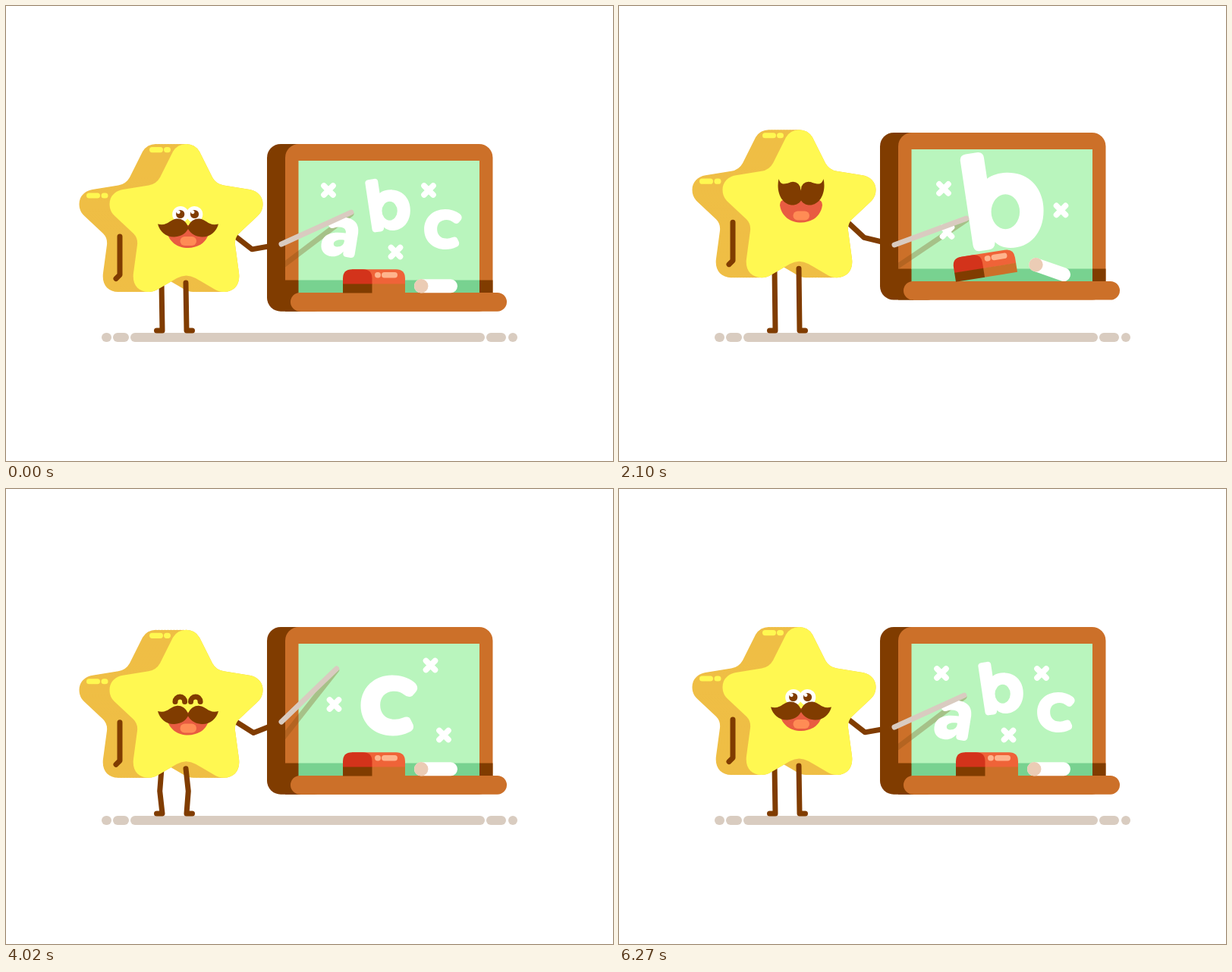
Recreate the animation shown at these times as an HTML page. Size 800 px wide and 600 px high, loop 6.3 s.

```html
<!DOCTYPE html>
<html lang="en">
<head>
<meta charset="utf-8">
<title>Star teacher</title>
<style>
  html, body { margin: 0; width: 100%; height: 100%; overflow: hidden; background: #fff; }
  svg { display: block; width: 800px; height: 600px; }
  .limb { fill: none; stroke: #803c00; stroke-width: 7; stroke-linecap: round; stroke-linejoin: round; }
  .cross { stroke: #fff; stroke-width: 7.6; stroke-linecap: round; }
</style>
</head>
<body>
<svg viewBox="0 0 800 600">
  <defs>
    <path id="star" d="M237.5 182Q249 182 255 192L272 226Q277 235 287 236.5L321 242C331 243.5 338.5 251 338.5 261C338.5 268 336 273 331 277.5L307 300Q301 306 302 315L307 352C309 367 301 377 287 377Q280 377 274 373L250 359Q237.5 352 225 359L201 373Q195 377 188 377C174 377 166 367 168 352L173 315Q174 306 168 300L144 277.5C139 273 136.5 268 136.5 261C136.5 251 144 243.5 154 242L188 236.5Q198 235 203 226L220 192Q226 182 237.5 182Z"/>
    <path id="a" d="M478 259C475 250 480 247 488 245.5Q500 243 510 243.5C530 245 542 256 539.5 276L532.5 320Q531 327.5 524 327L515 325.5Q508 324.5 508.5 318L509 314C503 321 495 325 485 324C470 322.5 462 312 463.5 299C465 283 478 276 493 275Q502 274.5 514 276Q515 266 505 264Q496 263 489 265.5Q481 268 478 259ZM511 290.5C500 288.5 490 291 489 297.5C488.5 303 494 305 500 304C507 302.5 511 298 511 290.5Z"/>
    <path id="b" d="M459.5 230Q458 223 465 221.5L477 219.5Q484 218.5 485 225L488.5 248C495 243.5 503 241.5 511 241.5C535 241.5 550 259 550 283C550 307 535 323.5 514 323.5C507 323.5 501 321 497 317Q497.5 324.5 490 325.5L480 327Q474 327.5 473 320ZM508.5 265A15.5 19 0 0 0 508.5 303A15.5 19 0 0 0 508.5 265Z"/>
    <path id="c" d="M538 254C543 258 544.5 263 540 268L536 272.5Q531 276 525 271C521 268 517 266.5 512 266.5C500 266.5 493 274 493 285C493 296 500 303.5 511 304Q517 304.5 523 302Q531 298.5 533.5 304L537 311Q539 318 532 321C525 324.5 518 326 510 326C485 326 467 309 467 285.5C467 262 485 245 509 245C520 245 530 248 538 254Z"/>
    <clipPath id="face"><path d="M368 150H660V378H368Z"/></clipPath>
  </defs>

  <g fill="#d9ccc0">
    <rect x="126" y="431" width="13" height="12" rx="6"/>
    <rect x="141" y="431" width="21" height="12" rx="6"/>
    <rect x="164" y="431" width="467" height="12" rx="6"/>
    <rect x="633" y="431" width="26" height="12" rx="6"/>
    <rect x="662" y="431" width="12" height="12" rx="6"/>
  </g>

  <path id="arm" class="limb"/>
  <path id="legL" class="limb"/>
  <g id="body">
    <g id="side" fill="#efbe45"></g>
    <g fill="#fff851">
      <rect x="189" y="186" width="18" height="7.2" rx="3.6"/>
      <rect x="208" y="186" width="9" height="7.2" rx="3.6"/>
      <rect x="106" y="246.4" width="18" height="7.2" rx="3.6"/>
      <rect x="125.5" y="246.4" width="9" height="7.2" rx="3.6"/>
      <use href="#star"/>
    </g>
    <path class="limb" d="M150 304V354.5L145 359.5"/>
    <g id="features">
      <path fill="#e85c41" d="M212 296Q212 288 222 289H258Q268 288 268 296C266 311 254 319 240 319C226 319 214 311 212 296Z"/>
      <rect x="229.5" y="304" width="21.5" height="12" rx="6" fill="#ff8c55"/>
      <g id="eyesOpen">
        <g fill="#fff"><circle cx="230" cy="274.7" r="10.8"/><circle cx="248.5" cy="274.7" r="10.8"/></g>
        <g fill="#803c00"><circle cx="229.7" cy="274.5" r="5.6"/><circle cx="248.5" cy="274.5" r="5.6"/></g>
        <g fill="#fff"><circle cx="227.3" cy="271.8" r="2.4"/><circle cx="246.1" cy="271.8" r="2.4"/></g>
      </g>
      <path id="eyesShut" class="limb" d="M223 275A6.3 6.3 0 0 1 235.6 275M243.5 275A6.3 6.3 0 0 1 256.1 275"/>
      <g fill="#803c00"><path id="hairL"/><path id="hairR" transform="matrix(-1 0 0 1 480 0)"/></g>
    </g>
  </g>
  <path id="legR" class="limb"/>

  <g id="board">
    <rect x="344" y="182" width="80" height="220.7" rx="18" fill="#803c00"/>
    <rect x="368" y="182" width="273.5" height="220.7" rx="18" fill="#cc7029"/>
    <path fill="#803c00" d="M368 361.5H641.5V378.5H388V402.7H368Z"/>
    <path fill="#b9f5bd" d="M385.5 204H624V362H385.5Z"/>
    <path fill="#78d290" d="M385.5 361.5H624V379H385.5Z"/>
  </g>
  <g clip-path="url(#face)">
    <path id="shadow" fill="none" stroke="#7a4a10" stroke-opacity=".3" stroke-width="7" stroke-linecap="round"/>
  </g>
  <g id="items">
    <g id="writing" fill="#fff" fill-rule="evenodd"></g>
    <rect x="375" y="378" width="285" height="24.7" rx="12.35" fill="#cc7029"/>
    <g id="eraser">
      <path fill="#ef6338" d="M456 347.3H514Q526 347.3 526 359.3V367H456Z"/>
      <path fill="#cc7029" d="M482 366.5H526V378.6H482Z"/>
      <path fill="#d3331b" d="M444 367V359.3Q444 347.3 456 347.3H470.5Q482.5 347.3 482.5 359.3V367Z"/>
      <path fill="#803c00" d="M444 366.5H482.5V378.6H444Z"/>
      <g fill="#ffb48d">
        <rect x="486" y="351" width="8" height="7.4" rx="3.7"/>
        <rect x="495" y="351" width="21" height="7.4" rx="3.7"/>
      </g>
    </g>
    <g id="chalk">
      <rect x="538" y="360.3" width="57" height="18" rx="9" fill="#fff"/>
      <circle cx="547.2" cy="369.3" r="9.2" fill="#ebccb5"/>
    </g>
  </g>
  <path id="pointer" fill="none" stroke="#d9cbc0" stroke-width="7" stroke-linecap="round"/>
</svg>

<script>
const LOOP = 6300, BEAT = 1230, WRITE_AT = 750;
const $ = id => document.getElementById(id);
const set = (id, name, value) => $(id).setAttribute(name, value);
const move = (id, y) => set(id, 'transform', `translate(0 ${y})`);
const show = (id, on) => set(id, 'visibility', on ? 'visible' : 'hidden');

// Eased interpolation through [time, value] pairs.
function track(keys, t) {
  if (t <= keys[0][0]) return keys[0][1];
  for (let i = 1; i < keys.length; i++) {
    const [t0, v0] = keys[i - 1], [t1, v1] = keys[i];
    if (t < t1) return v0 + (v1 - v0) * (1 - Math.cos(Math.PI * (t - t0) / (t1 - t0))) / 2;
  }
  return keys[keys.length - 1][1];
}

const TRACKS = {
  star: [[270, 0], [450, 14.5], [675, 14.5], [825, -24], [975, 0]],
  board: [[775, 0], [850, -18], [930, 0]],
  hand: [[240, 0], [480, -22], [675, -22], [795, 1], [870, 1], [960, 0]],
  swing: [[240, 0], [480, -62], [675, -62], [795, 4.5], [870, 4.3], [960, 0]],
  hair: [[690, 0], [780, -.12], [870, 1], [960, 0], [990, -.2], [1080, .12], [1170, -.06], [1260, 0]]
};

const CENTRE = { a: [501, 285.5], b: [504.5, 273], c: [505, 285.5] };
// Each page: letters as [glyph, x, y, size, delay] and cross positions.
const PAGES = [
  { letters: [['a', 501, 285.5, 1, 0]], crosses: [[438, 272.5], [565, 238], [571, 324.5]] },
  { letters: [['b', 504.5, 273, 1, 0]], crosses: [[428, 256], [432.5, 313], [582.5, 284.5]] },
  { letters: [['c', 505, 285.5, 1, 0]], crosses: [[432.5, 284], [559.5, 232.5], [577, 324.5]] },
  { letters: [['a', 439.5, 305.5, .64, 0], ['b', 503, 263, .655, 60], ['c', 576, 294.5, .655, 120]],
    crosses: [[425, 243], [557, 243], [513.5, 324.5]] }
];

const HAIR_REST = [240,291, 237,283, 231,280, 225,280.5, 216,281, 213,291, 200,287.5, 203,298, 211,305, 222,304.5, 232,304, 237,299, 240,294];
const HAIR_UP = [240,277, 238,269, 233,266, 229,266, 219,267, 214,272, 210.5,261.5, 207,277, 213,294, 227,296, 234,296.5, 238,293, 240,290];

for (let dx = 40; dx >= 0; dx -= 4) {
  $('side').insertAdjacentHTML('beforeend', `<use href="#star" x="${-dx}"/>`);
}

function pop(t) {
  if (t <= 0) return 0;
  if (t < 75) return t / 75;
  return 1 + .28 * Math.exp(-.004 * (t - 75)) * Math.sin(Math.PI * (t - 75) / 130);
}

function writePage({ letters, crosses }, age) {
  const glyphs = letters.map(([id, x, y, size, delay]) => {
    const [cx, cy] = CENTRE[id];
    return `<use href="#${id}" transform="translate(${x} ${y}) scale(${size * pop(age - delay)}) translate(${-cx} ${-cy})"/>`;
  });
  const marks = crosses.map(([x, y]) =>
    `<path class="cross" d="M${x - 6} ${y - 6}l12 12m0 -12l-12 12"/>`);
  $('writing').innerHTML = glyphs.join('') + marks.join('');
}

function drawLeg(id, hipX, hipY, footX, side, y) {
  const bend = side * 17 * Math.pow(Math.max(0, y) / 13.6, 1.4);
  const kneeX = (hipX + footX) / 2 + bend, kneeY = (hipY + y + 428) / 2;
  set(id, 'd', `M${hipX} ${hipY + y}L${kneeX} ${kneeY}L${footX} 428h${side * 7.5}`);
}

function drawArm(sx, sy, hx, hy) {
  const dx = hx - sx, dy = hy - sy, d = Math.hypot(dx, dy), stretch = Math.max(1, d / 74);
  const upper = 37 * stretch, lower = 39.5 * stretch;
  const along = (upper * upper - lower * lower + d * d) / (2 * d);
  const out = Math.sqrt(Math.max(0, upper * upper - along * along));
  const ex = sx + (dx * along - dy * out) / d, ey = sy + (dy * along + dx * out) / d;
  set('arm', 'd', `M${sx} ${sy}L${ex} ${ey}L${hx} ${hy}`);
}

function drawPointer(x, y, degrees) {
  const angle = degrees * Math.PI / 180;
  const tipX = x + 101 * Math.cos(angle), tipY = y + 101 * Math.sin(angle);
  set('pointer', 'd', `M${x} ${y}L${tipX} ${tipY}`);
  set('shadow', 'd', `M${x} ${y + 33 * Math.cos(angle)}L${tipX} ${tipY + 2}`);
}

function drawHair(lift) {
  const p = HAIR_REST.map((v, i) => v + (HAIR_UP[i] - v) * lift);
  const d = `M${p.slice(0, 2)}C${p.slice(2)}Z`;
  set('hairL', 'd', d);
  set('hairR', 'd', d);
}

const arc = (t, start, end) => t > start && t < end ? Math.sin(Math.PI * (t - start) / (end - start)) : 0;

function render(t) {
  const beat = Math.max(0, Math.min(3, Math.floor((t - 240) / BEAT)));
  const p = t - beat * BEAT;
  const at = name => track(TRACKS[name], p);
  const y = at('star'), lift = at('board'), handY = 314 + at('hand');

  move('body', y);
  move('features', y * (y < 0 ? .78 : .45));
  drawHair(at('hair'));
  const open = t < 285 || t > 5040;
  show('eyesOpen', open);
  show('eyesShut', !open);

  drawLeg('legL', 205, 365, 206, -1, y);
  drawLeg('legR', 237, 365, 238, 1, y);
  drawArm(295, 298 + y, 363, handY);
  drawPointer(363, handY, -24.5 + at('swing'));

  move('board', lift);
  move('items', lift);
  set('eraser', 'transform', `rotate(${-9 * arc(p, 780, 960)} 445 378.6)`);
  set('chalk', 'transform', `rotate(${24.5 * arc(p, 790, 1070)} 586.5 369.3)`);

  if (p >= WRITE_AT - 15) writePage(PAGES[beat], p - WRITE_AT + 1);
  else if (beat > 0) writePage(PAGES[beat - 1], p + BEAT - WRITE_AT);
  else writePage(PAGES[3], 1e5);
}

const start = performance.now();
function tick() {
  render((performance.now() - start) % LOOP);
  requestAnimationFrame(tick);
}
tick();
</script>
</body>
</html>
```
